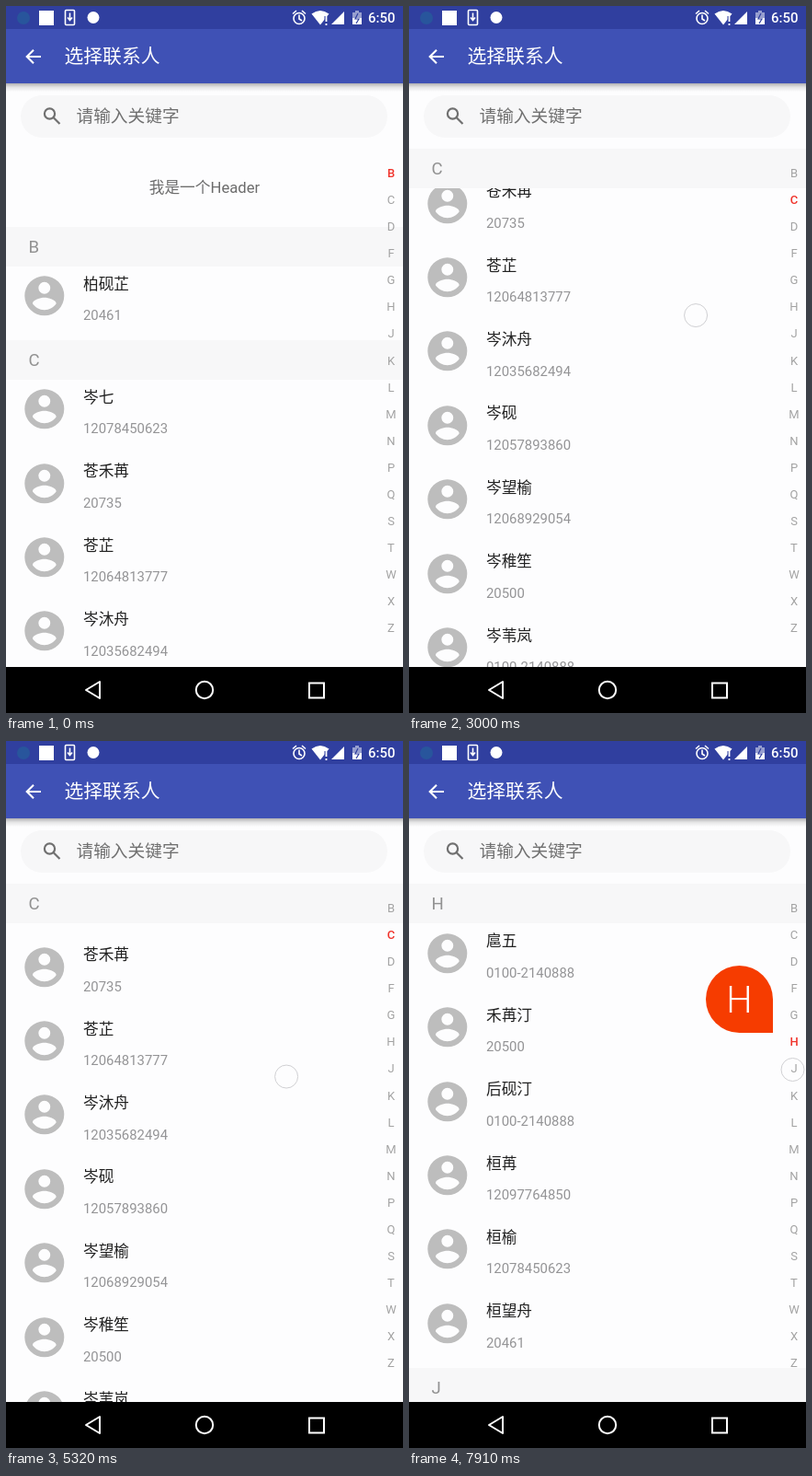
An HTML page for the animation above (8000 ms loop, 432 by 768 pixels).

```html
<!DOCTYPE html>
<html lang="zh-CN">
<head>
<meta charset="utf-8">
<title>选择联系人</title>
<style>
html, body { margin: 0; width: 100%; height: 100%; overflow: hidden; background: #000; }
#stage { position: absolute; left: 0; top: 0; width: 432px; height: 768px; overflow: hidden; background: #fdfdfe;
  font-family: Roboto, "Noto Sans CJK SC", "Noto Sans CJK", sans-serif; }
#stage * { position: absolute; white-space: nowrap; box-sizing: border-box; }
svg { overflow: visible; }
#status { width: 432px; height: 25px; background: #303f9f; }
#clock { left: 394px; top: 3px; font: 500 15px/20px Roboto, sans-serif; color: #fff; }
#bar { top: 25px; width: 432px; height: 59px; background: #3f51b5; }
#bar b { left: 63.5px; top: 15px; font-weight: 400; font-size: 20.8px; line-height: 30px; color: #fff; }
#shade { top: 84px; width: 432px; height: 9px; background: linear-gradient(#0000004d, #0000001a 45%, #00000000); }
#search { left: 16px; top: 97px; width: 399px; height: 46px; border-radius: 23px; background: #f7f7f8; }
#search span { left: 60.5px; top: 8px; font-size: 18.7px; line-height: 30px; color: #707070; }
#list { top: 155px; width: 432px; height: 563px; overflow: hidden; isolation: isolate; }
#stage #list > *, #stage .row { position: relative; }
#intro { height: 84.5px; font-size: 16.7px; line-height: 86px; text-align: center; color: #6c6c6c; }
#stage .head { position: sticky; top: 0; z-index: 1; height: 43px; padding-left: 24.5px; background: #f7f7f8;
  font-size: 18.6px; line-height: 44px; color: #929292; }
.row { height: 80.4px; }
.row svg { left: 16.2px; top: 6.4px; width: 51.6px; height: 51.6px; fill: #bdbdbd; }
.name { left: 84px; top: 10px; font-size: 16.7px; line-height: 20px; color: #212121; }
.tel { left: 84px; top: 43.5px; font-size: 14.9px; line-height: 20px; color: #949496; }
#index span { left: 409px; width: 20px; text-align: center; font-size: 13px; line-height: 20px; color: #a3a3a3; }
#stage #index .on { color: #f0342c; font-weight: 500; }
#bubble { left: 323px; top: 0; width: 73px; height: 73px; border-radius: 50% 50% 0 50%; background: #f63c00;
  color: #fff; text-align: center; font-size: 40px; font-weight: 300; line-height: 76px; }
#finger { left: -13px; top: -13px; width: 26px; height: 26px; border-radius: 50%; border: 1.6px solid #cfcfd2; }
#nav { top: 718px; width: 432px; height: 50px; background: #000; }
</style>
</head>
<body>
<div id="stage">
  <div id="list"><div id="intro">我是一个Header</div></div>
  <div id="shade"></div>
  <div id="search"><span>请输入关键字</span></div>
  <div id="status"></div>
  <div id="bar"><b>选择联系人</b></div>
  <div id="nav"></div>
  <div id="clock">6:50</div>
  <svg width="432" height="768" viewBox="0 0 432 768" fill="none">
    <g fill="#fff">
      <circle cx="19" cy="13" r="7" fill="#28559c"/>
      <path d="M36 5h16v16H36z"/>
      <circle cx="95" cy="12.5" r="6.5"/>
      <path d="M332.5 8.5Q342 1.500 351.500 8.500L342 20.500z"/>
      <path d="M368 6v14H354z"/>
      <path d="M380 5h4v2h3v13h-10V7h3z" fill="#979fcf"/>
      <path d="M377 13h10v7h-10z"/>
    </g>
    <path d="M348.500 11v6m0 2v2" stroke="#303f9f" stroke-width="4"/>
    <path d="M348.500 11v6m0 2v2" stroke="#fff" stroke-width="1.800"/>
    <path d="M383 8l-3 6h4l-3 5" stroke="#303f9f" stroke-width="1.200"/>
    <g stroke="#fff" stroke-width="1.600">
      <rect x="64.500" y="4.500" width="10" height="16" rx="1"/>
      <path d="M69.500 7.500v8m-2.500-3l2.500 3 2.500-3"/>
      <circle cx="319" cy="13.500" r="6"/>
      <path d="M319 9.500v4.500l3 2M312 8.500l4-3.500M326 8.500l-4-3.500"/>
    </g>
    <path d="M38 55H23m7-7.300L22.700 55l7.300 7.300" stroke="#fff" stroke-width="2.100"/>
    <g stroke="#707070" stroke-width="2.200">
      <circle cx="47.500" cy="117" r="5.600"/><path d="M51.500 121l7 7"/>
    </g>
    <g stroke="#fff" stroke-width="2">
      <path d="M102 734v18L87 743z" stroke-linejoin="round"/>
      <circle cx="216" cy="743" r="9.200"/>
      <rect x="330" y="735.500" width="16" height="16"/>
    </g>
  </svg>
  <div id="index"></div>
  <div id="bubble"></div>
  <div id="finger"></div>
</div>
<script>
const LOOP = 8000, LETTERS = 'BCDFGHJKLMNPQSTWXZ', STEP = 29.08, FIRST_Y = 182;
const HEAD = 43, ROW = 80.4, INTRO = 84.5;
const LAND = '0100-2140888', MOBILE = '12078450623';

const CONTACTS = {
  B: [['柏砚芷', '20461']],
  C: [['岑七', MOBILE], ['苍禾苒', '20735'], ['苍芷', '12064813777'], ['岑沐舟', '12035682494'],
      ['岑砚', '12057893860'], ['岑望榆', '12068929054'], ['岑稚笙', '20500'], ['岑苇岚', LAND]],
  D: [['邸禾汀', '20461'], ['邸七', MOBILE]],
  F: [['酆禾', '20735'], ['酆砚汀', LAND]],
  G: [['戈砚舟', MOBILE], ['戈苒', '20500']],
  H: [['扈五', LAND], ['禾苒汀', '20500'], ['后砚汀', LAND], ['桓苒', '12097764850'],
      ['桓榆', MOBILE], ['桓望舟', '20461']],
  J: [['稷苒', '20735'], ['稷禾舟', LAND], ['稷七', '20500'], ['稷砚', MOBILE],
      ['稷望汀', '20461'], ['稷榆', '20735'], ['稷笙', LAND]]
};

// time, list scroll, finger y
const DRAG = [
  [0, 0, 632], [570, 0, 632], [1420, 112, 516], [2020, 242, 391], [2500, 318, 321],
  [3000, 305, 336], [4560, 111, 527], [4710, 107, 533], [4900, 109, 530],
  [5400, 285, 353], [5880, 217, 427], [6400, 95, 547]
];
const PRESS = 580, RELEASE = 6400, SLIDE = 6650, SLIDE_END = 7910;

const $ = id => document.getElementById(id);
const AVATAR = '<svg viewBox="0 0 24 24"><path fill-rule="evenodd" d="M12 2a10 10 0 1 0 0 20a10 10 0 1 0 0-20z' +
  'm0 3a3 3 0 1 1 0 6a3 3 0 1 1 0-6zm0 14.2c-2.500 0-4.710-1.280-6-3.220c.03-1.990 4-3.080 6-3.080' +
  's5.970 1.090 6 3.080c-1.290 1.940-3.500 3.220-6 3.220z"/></svg>';

const tops = [];
let y = INTRO;
for (const [letter, people] of Object.entries(CONTACTS)) {
  tops.push(y);
  y += HEAD + ROW * people.length;
  const rows = people.map(([name, tel]) =>
    `<div class="row">${AVATAR}<span class="name">${name}</span><span class="tel">${tel}</span></div>`);
  $('list').insertAdjacentHTML('beforeend', `<section><div class="head">${letter}</div>${rows.join('')}</section>`);
}
$('index').innerHTML = [...LETTERS].map((c, i) =>
  `<span style="top:${FIRST_Y - 10 + i * STEP}px">${c}</span>`).join('');
const marks = [...$('index').children];

// Monotone cubic through the chosen column of DRAG.
function sample(t, col) {
  const last = DRAG.length - 2;
  let i = 0;
  while (i < last && t >= DRAG[i + 1][0]) i++;
  const slope = k => k < 0 || k > last ? 0 : (DRAG[k + 1][col] - DRAG[k][col]) / (DRAG[k + 1][0] - DRAG[k][0]);
  const tangent = k => {
    const a = slope(k - 1), b = slope(k);
    return a * b > 0 ? 2 * a * b / (a + b) : 0;
  };
  const [a, b] = [DRAG[i], DRAG[i + 1]], h = b[0] - a[0], u = Math.min(1, (t - a[0]) / h), v = 1 - u;
  return a[col] * v * v * (1 + 2 * u) + b[col] * u * u * (3 - 2 * u)
    + h * u * v * (v * tangent(i) - u * tangent(i + 1));
}

function render(t) {
  const sliding = t >= SLIDE;
  let scroll, active, x, fy;
  if (sliding) {
    fy = 205 + 152 * Math.min(1, (t - SLIDE) / (SLIDE_END - SLIDE));
    x = 417.5;
    active = Math.floor((fy - FIRST_Y - STEP / 2) / STEP);
    scroll = tops[active];
  } else {
    scroll = sample(t, 1);
    fy = sample(t, 2);
    x = 268 + (516 - fy) * 0.245;
    active = Math.max(0, tops.findLastIndex(top => top <= scroll));
  }
  $('list').scrollTop = scroll;
  marks.forEach((m, i) => m.classList.toggle('on', i === active));
  $('finger').style.visibility = sliding || (t >= PRESS && t < RELEASE) ? 'visible' : 'hidden';
  $('finger').style.transform = `translate(${x}px, ${fy}px)`;
  $('bubble').style.visibility = sliding ? 'visible' : 'hidden';
  $('bubble').style.transform = `translateY(${fy - 113}px)`;
  $('bubble').textContent = LETTERS[active];
}

const start = performance.now();
function tick() {
  render((performance.now() - start) % LOOP);
  requestAnimationFrame(tick);
}
tick();
</script>
</body>
</html>
```
